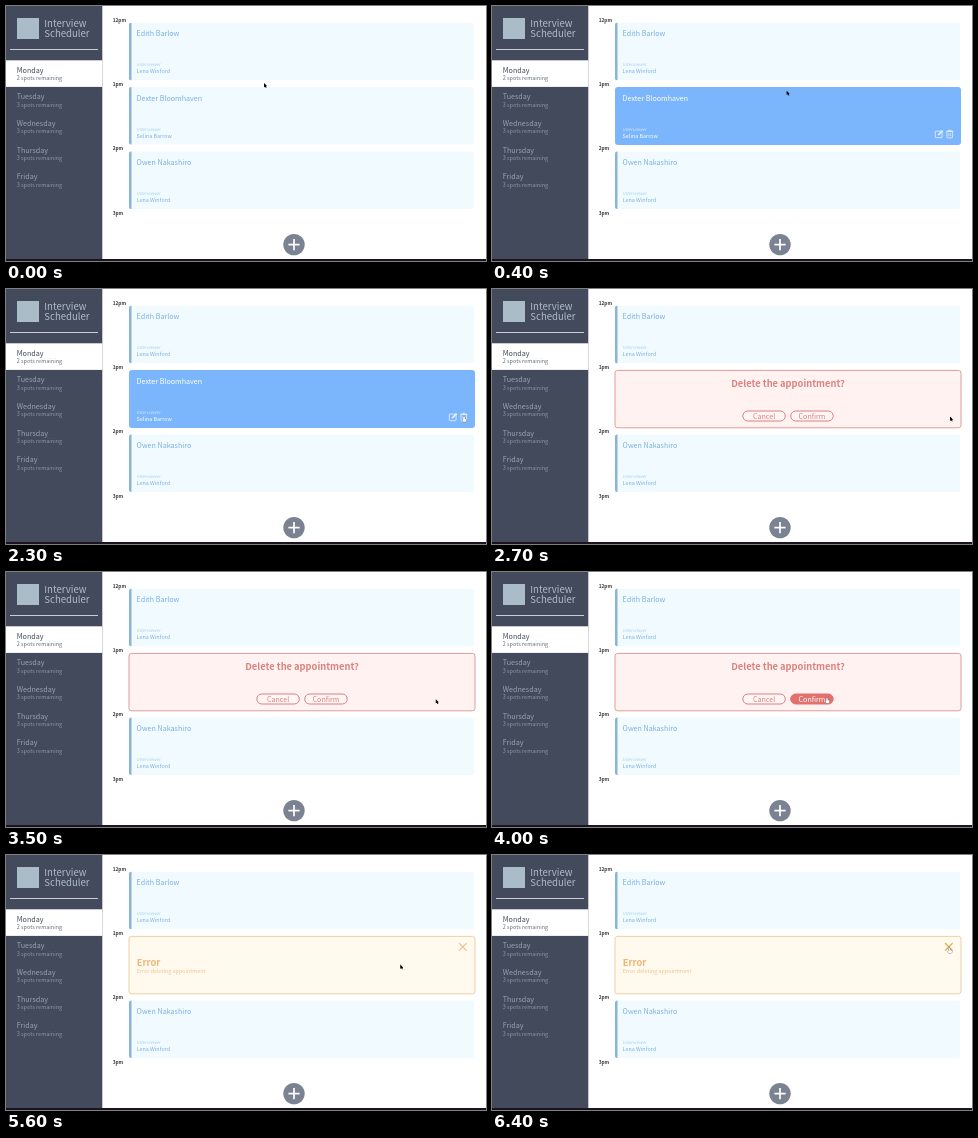
These frames come from a looping animation (480x255 px, 6500 ms). An HTML page with a canvas:

```html
<!DOCTYPE html>
<html lang="en">
<head>
<meta charset="utf-8">
<title>Interview Scheduler</title>
<style>
  html, body { margin: 0; width: 100%; height: 100%; overflow: hidden; background: #fff; }
  canvas { display: block; width: 480px; height: 255px; }
</style>
</head>
<body>
<canvas id="stage"></canvas>
<script>
const W = 480, H = 255, LOOP = 6500, STEP = 100;
const FONT = '"Noto Sans CJK SC", "Noto Sans CJK JP", "Noto Sans CJK KR", "Noto Sans CJK", "Noto Sans", sans-serif';
const canvas = document.getElementById('stage');
const ctx = canvas.getContext('2d');
const ratio = window.devicePixelRatio || 1;
canvas.width = W * ratio;
canvas.height = H * ratio;
ctx.scale(ratio, ratio);

const CARD = { x: 123, w: 346, h: 58 };
const SLOT_PITCH = 64.3, DAY_PITCH = 26.6;
const BLUE = '#79afe0', RED = '#d9827f', AMBER = '#ecb676';
const DAYS = ['Monday', 'Tuesday', 'Wednesday', 'Thursday', 'Friday'];
const SLOTS = [
  { name: 'Edith Barlow', host: 'Lena Winford' },
  { name: 'Dexter Bloomhaven', host: 'Selina Barrow' },
  { name: 'Owen Nakashiro', host: 'Lena Winford' }
];

// Each move takes the pointer from where it rests to x, y
const HOME = { x: 258, y: 77 };
const MOVES = [
  { from: 0, to: 1100, x: 425, y: 112 },
  { from: 1500, to: 2100, x: 458, y: 127.5 },
  { from: 3200, to: 4000, x: 335, y: 126 },
  { from: 4000, to: 4700, x: 327, y: 127 },
  { from: 4700, to: 6100, x: 457.5, y: 93 }
];

function pointerAt(t) {
  return MOVES.reduce((p, m) => {
    const k = Math.min(1, Math.max(0, (t - m.from) / (m.to - m.from))) ** 1.5;
    return { x: p.x + (m.x - p.x) * k, y: p.y + (m.y - p.y) * k };
  }, HOME);
}

function text(str, x, y, size, color, style = '', align = 'left') {
  ctx.font = `${style} ${size}px ${FONT}`;
  ctx.fillStyle = color;
  ctx.textAlign = align;
  ctx.fillText(str, x, y);
}

function rect(x, y, w, h, color) {
  ctx.fillStyle = color;
  ctx.fillRect(x, y, w, h);
}

function box(x, y, w, h, r, fill, stroke, width = 1) {
  ctx.beginPath();
  ctx.roundRect(x, y, w, h, r);
  if (fill) {
    ctx.fillStyle = fill;
    ctx.fill();
  }
  if (stroke) {
    ctx.strokeStyle = stroke;
    ctx.lineWidth = width;
    ctx.stroke();
  }
}

function line(x1, y1, x2, y2, color, width) {
  ctx.strokeStyle = color;
  ctx.lineWidth = width;
  ctx.beginPath();
  ctx.moveTo(x1, y1);
  ctx.lineTo(x2, y2);
  ctx.stroke();
}

// Two crossed strokes of half-length r
function cross(x, y, r, angle, color, width) {
  ctx.save();
  ctx.translate(x, y);
  ctx.rotate(angle);
  line(-r, 0, r, 0, color, width);
  line(0, -r, 0, r, color, width);
  ctx.restore();
}

function sidebar() {
  rect(0, 0, 96.3, H, '#424a5b');
  rect(11, 12, 22, 21, '#a9bcc8');
  text('Interview', 38.3, 21.2, 9.6, '#b0bccb', '300');
  text('Scheduler', 38.3, 31, 9.6, '#b0bccb', '300');
  rect(4, 43, 88, 1, '#c9ced6');
  rect(0, 54.3, 96.3, DAY_PITCH, '#fff');
  DAYS.forEach((day, i) => {
    const y = 66.8 + i * DAY_PITCH;
    text(day, 10.7, y, 7.2, i ? '#98a3b2' : '#424a5a', '500');
    text(`${i ? 3 : 2} spots remaining`, 10.7, y + 7.4, 5.5, i ? '#8d98a7' : '#646c7a');
  });
}

function editIcon(x, y, color) {
  box(x, y, 6.8, 6.6, 0.6, null, color, 0.8);
  line(x + 2.8, y + 4, x + 7.4, y - 0.4, color, 1.6);
}

function trashIcon(x, y, color) {
  box(x + 0.8, y, 5.6, 6.6, 0.6, null, color, 0.8);
  line(x, y, x + 7.2, y, color, 0.9);
  line(x + 2.2, y - 1, x + 5, y - 1, color, 0.8);
  for (const dx of [2.7, 4.5]) line(x + dx, y + 1.6, x + dx, y + 5, color, 0.7);
}

function appointment(slot, y, active) {
  const { x, w, h } = CARD;
  if (active) {
    box(x, y, w, h, 3, '#7bb5fc');
    editIcon(443.3, 125.1, '#e8f2ff');
    trashIcon(454.2, 125.3, '#e8f2ff');
  } else {
    box(x, y, w - 1, h - 0.5, 2, '#f1fbff');
    box(x, y, 2.5, h - 0.5, [2, 0, 0, 2], '#8ab3dc');
  }
  text(slot.name, 130.6, y + 13.5, 7.15, active ? '#fff' : BLUE);
  text('Interviewer', 130.6, y + 43.4, 4.5, active ? '#d9eaff' : '#a6cdec', 'italic');
  text(slot.host, 130.6, y + 50.6, 5.45, active ? '#fff' : BLUE);
}

function panel(y, fill, stroke) {
  box(CARD.x, y + 0.3, CARD.w, CARD.h - 0.6, 2.5, fill, stroke);
}

function pill(label, x, hot) {
  const fill = hot ? '#e2716d' : '#fff5f4';
  box(x, 122, 42.5, 10, 5, fill, hot ? fill : RED);
  text(label, x + 21.25, 129.7, 7.1, hot ? '#fff' : RED, '', 'center');
}

function confirmPanel(y, hot) {
  panel(y, '#fff2f1', '#de9d9a');
  text('Delete the appointment?', 296, y + 16.4, 9.3, RED, 'bold', 'center');
  pill('Cancel', 250.8, false);
  pill('Confirm', 298.7, hot);
}

function errorPanel(y, hot) {
  panel(y, '#fff9ee', '#ecd0a4');
  text('Error', 130.8, y + 29.4, 9.3, AMBER, 'bold');
  text('Error deleting appointment', 130.8, y + 37.1, 5.4, '#eec58c');
  cross(456.8, y + 10.8, 5.3, Math.PI / 4, hot ? '#dca048' : '#edc28c', 1.2);
}

function addButton(x, y) {
  ctx.beginPath();
  ctx.arc(x, y, 10.7, 0, 2 * Math.PI);
  ctx.fillStyle = '#7b8392';
  ctx.fill();
  cross(x, y, 5.6, 0, '#fff', 1.7);
}

function arrow(x, y) {
  ctx.beginPath();
  ctx.moveTo(x, y);
  ctx.lineTo(x, y + 4.2);
  ctx.lineTo(x + 3, y + 3);
  ctx.closePath();
  ctx.fillStyle = '#000';
  ctx.fill();
  line(x + 1, y + 2, x + 2.1, y + 4.8, '#000', 1);
}

function hand(x, y) {
  for (const edge of ['#444', null]) {
    box(x - 0.7, y, 1.4, 3, 0.7, '#fff', edge, 0.7);
    box(x - 1.4, y + 2.2, 3.8, 3, 1.2, '#fff', edge, 0.7);
  }
}

function draw(t) {
  const { x, y } = pointerAt(t);
  const view = t < 2700 ? 'show' : t < 4700 ? 'confirm' : 'error';
  const hot = {
    show: x > 452 && y > 123,
    confirm: x < 341.5,
    error: x > 452 && y < 97
  }[view];

  rect(0, 0, W, H, '#fff');
  sidebar();
  ['12pm', '1pm', '2pm', '3pm'].forEach((label, i) =>
    text(label, 106.7, 15.7 + i * SLOT_PITCH, 4.8, '#333', 'bold'));
  SLOTS.forEach((slot, i) => {
    const top = 16.8 + i * SLOT_PITCH;
    if (i !== 1 || view === 'show') appointment(slot, top, i === 1 && y > 80);
    else if (view === 'confirm') confirmPanel(top, hot);
    else errorPanel(top, hot);
  });
  addButton(288, 238.6);
  rect(0, 253, W, 2, '#1b1420');
  (hot ? hand : arrow)(x, y);
}

const start = performance.now();
function tick() {
  const t = (performance.now() - start) % LOOP;
  draw(Math.floor(t / STEP) * STEP);
  requestAnimationFrame(tick);
}
tick();
</script>
</body>
</html>
```
